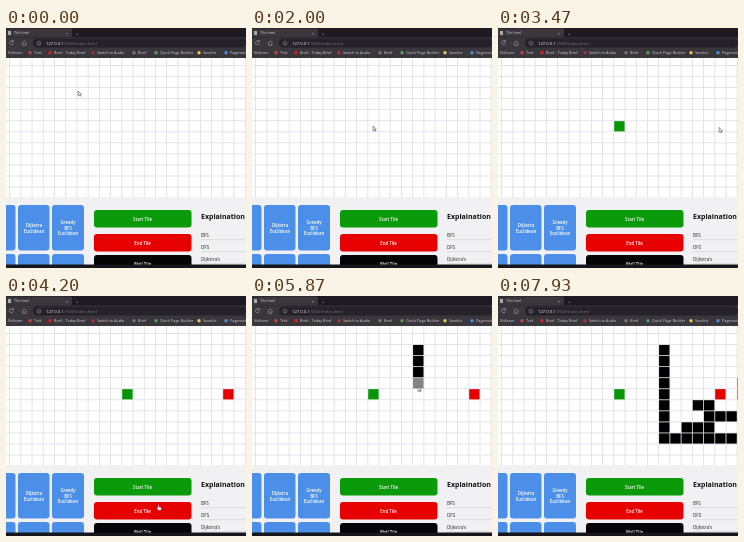
Recreate the animation shown at these times as an HTML page. Size 240 by 240 pixels, loop 8 s.

```html
<!DOCTYPE html>
<html lang="en">
<head>
<meta charset="utf-8">
<title>Pathfinding grid</title>
<style>
  html, body { margin: 0; width: 100%; height: 100%; overflow: hidden; background: #fff; }
  svg { display: block; width: 100vw; height: 100vh; }
  text { font-family: "Open Sans", "Noto Sans", sans-serif; }
  .label { fill: #fff; font-size: 4.4px; font-weight: 600; text-anchor: middle; }
  .chrome { fill: #d2d0d5; font-size: 3.8px; }
  .topic { fill: #222; font-size: 4.6px; }
</style>
</head>
<body>
<svg viewBox="0 0 240 240">
  <rect width="240" height="240" fill="#fff"/>
  <g id="grid"></g>
  <g id="tiles"></g>
  <g id="browser"></g>
  <g id="panel"></g>
  <path id="arrow" d="M0 0v4.6l1.1-1 .8 1.7.8-.4-.8-1.6h1.5z" fill="#fff" stroke="#333" stroke-width=".5"/>
  <path id="hand" d="M0-2q.7-.5 1 0v2l2 .4q.6.3.4 1.2l-.5 1.6H.3L-1.3 1q0-.8.8-.4l.5.4z" fill="#fff" stroke="#333" stroke-width=".3"/>
</svg>
<script>
const LOOP = 8000, STEP = 1000 / 15;
const PITCH_X = 11.22, PITCH_Y = 11.05, LEFT = 3.6, TOP = 37.5;
const byId = id => document.getElementById(id);

function add(parent, tag, attrs, content) {
  const node = document.createElementNS("http://www.w3.org/2000/svg", tag);
  for (const key in attrs) node.setAttribute(key, attrs[key]);
  if (content) node.textContent = content;
  return byId(parent).appendChild(node);
}
const box = (parent, x, y, width, height, fill, rx = 0) =>
  add(parent, "rect", { x, y, width, height, fill, rx });
const write = (parent, x, y, content, cls, extra = {}) =>
  add(parent, "text", { x, y, class: cls, ...extra }, content);

// Grid lines
for (let i = 0; i < 22; i++) box("grid", LEFT + i * PITCH_X - .4, 30, .8, 140, "#dcdde6");
for (let i = 0; i < 13; i++) box("grid", 0, TOP + i * PITCH_Y - .4, 240, .8, "#dcdde6");

// Browser frame
box("browser", 0, 0, 240, 30, "#39363c");
box("browser", 0, 0, 240, 9.5, "#1d1b21");
box("browser", 0, .5, 66, 9, "#39363c", 1.5);
box("browser", 2, 3, 3, 4, "#aaa");
write("browser", 8, 6.4, "Tile.html", "chrome");
write("browser", 60, 6.5, "×", "chrome");
write("browser", 70, 6.8, "+", "chrome");
box("browser", 27, 10.5, 213, 9, "#252329", 4);
add("browser", "path", {
  d: "M7 13.3a2 2 0 1 0 .5 2M7.4 12v1.8H5.6M16 15l2.3-2 2.3 2M16.7 15v2.3h3.2V15M33 14.7v1.8",
  fill: "none", stroke: "#aaa", "stroke-width": .6
});
add("browser", "circle", { cx: 33, cy: 15.2, r: 2, fill: "none", stroke: "#999", "stroke-width": .5 });
const address = write("browser", 40, 16.7, "127.0.0.1", "chrome", { style: "fill:#eee;font-size:4.2px" });
const rest = document.createElementNS("http://www.w3.org/2000/svg", "tspan");
rest.textContent = ":5500/index.html";
rest.setAttribute("fill", "#77747c");
address.append(rest);

[[2, "Vidloom"], [28, "Trek", "#c94040"], [48, "Brief - Today Brief", "#e02020"],
 [91, "Switch to Audio", "#a33"], [132, "Brief", "#777"], [154, "Quick Page Builder", "#58a05a"],
 [197, "Savelist", "#e8c552"], [224, "Pagenook", "#4a8ee0"]].forEach(([x, name, color]) => {
  if (color) add("browser", "circle", { cx: x - 4, cy: 24.8, r: 1.7, fill: color });
  write("browser", x, 26.2, name, "chrome");
});

// Control panel
box("panel", 0, 169.5, 240, 67, "#f1f1f4");
[[-22, 31.5], [12, 31.5], [46, 32]].forEach(([x, w]) => {
  box("panel", x, 177, w, 45.5, "#4b8fe8", 3);
  box("panel", x, 226, w, 20, "#4b8fe8", 3);
});
[["Dijkstra", 28, 199], ["Euclidean", 28, 205], ["Greedy", 62, 196], ["BFS", 62, 201.5], ["Euclidean", 62, 207]]
  .forEach(([word, x, y]) => write("panel", x, y, word, "label"));
const startButton = box("panel", 88, 182, 97.5, 17.5, "#0a9a0a", 3);
const endButton = box("panel", 88, 206, 97.5, 17.5, "#e60000", 3);
box("panel", 88, 227, 97.5, 20, "#050505", 3);
["Start Tile", "End Tile", "Wall Tile"].forEach((word, i) =>
  write("panel", 136.5, [192.5, 216.6, 237.5][i], word, "label"));
write("panel", 195, 190.5, "Explaination", "", { "font-size": 7, "font-weight": 700, fill: "#111" });
["BFS", "DFS", "Dijkstra's"].forEach((word, i) => {
  write("panel", 195, 208.8 + i * 12, word, "topic");
  box("panel", 195, 211.5 + i * 12, 45, .6, "#cfcfd4");
});
box("panel", 0, 236.5, 240, 3.5, "#17161b");

// Tiles: column, row, time placed, colour
const tiles = [];
function place(col, row, time, rgb = [0, 0, 0]) {
  const node = box("tiles", LEFT + col * PITCH_X + .4, TOP + row * PITCH_Y + .4, PITCH_X - .8, PITCH_Y - .8, `rgb(${rgb})`);
  tiles.push({ node, time });
}
place(10, 5, 2080, [8, 150, 8]);
place(19, 5, 3620, [230, 0, 0]);
for (let i = 0; i < 9; i++) place(14, 1 + i, 5420 + i * 138);
[[15, 9], [16, 9], [17, 9], [18, 9], [19, 9], [20, 9], [20, 7], [19, 7], [18, 7], [18, 6], [17, 6],
 [18, 8], [17, 8], [16, 8], [21, 5], [21, 4]]
  .forEach(([col, row], i) => place(col, row, 6680 + i * 72));

// Pointer stops: time, x, y
const stops = [
  [0, 72, 63], [300, 80, 75], [950, 140, 190], [1330, 176, 188], [1530, 172, 188],
  [1950, 121, 98], [2170, 121, 98], [2600, 154, 219], [2730, 154, 220], [3000, 155, 219],
  [3500, 222, 98], [3720, 222, 98], [4200, 152, 211], [4420, 148, 233], [4600, 148, 233],
  [5130, 177, 55], [5400, 166, 53], [6500, 166, 142], [6600, 177, 138], [6680, 177, 142],
  [7110, 233, 142], [7190, 233, 120], [7330, 211, 120], [7480, 200, 109], [7620, 199, 131],
  [7700, 188, 131], [7840, 244, 98], [8000, 246, 90]
];
const clamp = v => Math.max(0, Math.min(1, v));
const smooth = v => v * v * (3 - 2 * v);
const mix = (a, b, k) => a + (b - a) * k;
const hover = (t, from, to) => clamp((t - from) / 150) * clamp((to - t) / 150);
const blend = (a, b, k) => `rgb(${a.map((v, i) => Math.round(mix(v, b[i], k)))})`;

function pointerAt(t) {
  const next = Math.max(1, stops.findIndex(stop => stop[0] > t));
  const [t0, x0, y0] = stops[next - 1], [t1, x1, y1] = stops[next];
  const raw = (t - t0) / (t1 - t0);
  const k = t > 5400 ? raw : smooth(raw);
  return [mix(x0, x1, k), mix(y0, y1, k)];
}

function draw(now) {
  const t = Math.floor((now % LOOP) / STEP + .01) * STEP;
  for (const { node, time } of tiles) node.setAttribute("opacity", clamp((t - time + 40) / 150));
  startButton.setAttribute("fill", blend([10, 154, 10], [6, 140, 6], hover(t, 950, 1700)));
  endButton.setAttribute("fill", blend([230, 0, 0], [168, 0, 0], hover(t, 2510, 3200)));

  const [x, y] = pointerAt(t);
  const onButton = x > 88 && x < 185 && ((y > 182 && y < 199) || (y > 206 && y < 223) || y > 227);
  for (const [id, shown] of [["arrow", !onButton], ["hand", onButton]]) {
    byId(id).setAttribute("transform", `translate(${x} ${y})`);
    byId(id).setAttribute("visibility", shown ? "visible" : "hidden");
  }
}

const began = performance.now();
function tick() {
  draw(performance.now() - began);
  requestAnimationFrame(tick);
}
tick();
</script>
</body>
</html>
```
